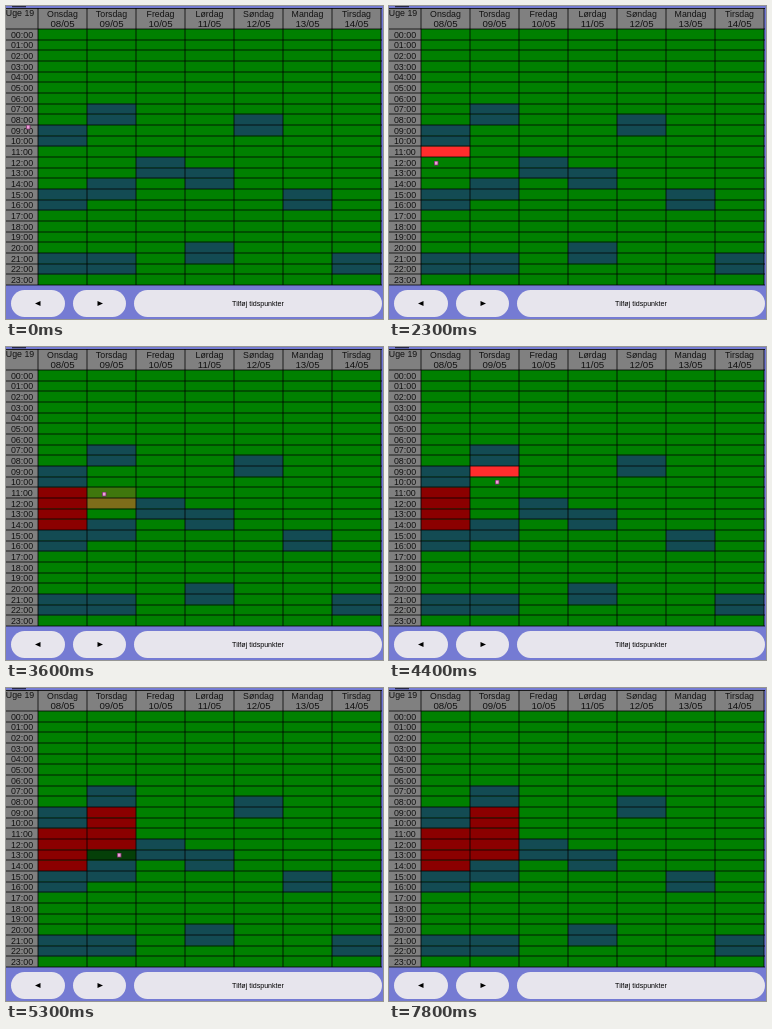
An HTML page with a canvas for the animation above (7900 ms loop, 377x313 px).

```html
<!DOCTYPE html>
<html lang="da">
<head>
<meta charset="utf-8">
<style>
  html, body { margin: 0; width: 100%; height: 100%; overflow: hidden; background: #757bd3; }
  canvas { display: block; }
</style>
</head>
<body>
<canvas id="stage" width="377" height="313"></canvas>
<script>
const ctx = document.getElementById('stage').getContext('2d');
const LOOP = 7900, STEP = 100;
const LEFT = 32, TOP = 23, COL = 49, ROW = 256 / 24;
const GREEN = '#008000', TEAL = '#134b53', DARK_RED = '#8b0000', BRIGHT_RED = '#ff2d2d', HOVER = '#053f08';
const days = ['Onsdag', 'Torsdag', 'Fredag', 'Lørdag', 'Søndag', 'Mandag', 'Tirsdag'];
// First hour of each two-hour booking, per day
const booked = [[9, 15, 21], [7, 14, 21], [12], [13, 20], [8], [15], [21]];
// A first click marks the start, a second click fills the range
const ranges = [
  { day: 0, from: 11, to: 14, start: 2100, end: 3000, leave: 3200 },
  { day: 1, from: 9, to: 13, start: 4100, end: 4800, leave: 5400 }
];
// Cells lit briefly as the pointer passes: day, hour, peak time
const trail = [[1, 13, 3400], [1, 12, 3550], [1, 11, 3700], [1, 10, 3850]];
// Pointer path: time, x, y
const path = [
  [0, 22, 121], [1600, 22, 121], [2000, 46, 147], [2300, 47, 157], [2900, 48, 178],
  [3100, 50, 178], [3400, 94, 168], [3600, 98, 147], [4000, 106, 125], [4200, 108, 128],
  [4400, 108, 135], [4800, 113, 167], [5300, 113, 167], [6000, -12, 140]
];

function rect(color, x, y, w, h) {
  ctx.fillStyle = color;
  ctx.fillRect(x, y, w, h);
}

function text(str, x, y, size, color = '#111') {
  ctx.font = `${size}px "Liberation Sans", Arial, sans-serif`;
  ctx.textAlign = 'center';
  ctx.fillStyle = color;
  ctx.fillText(str, x, y);
}

function cell(day, hour, color) {
  rect(color, LEFT + day * COL, TOP + hour * ROW, COL, ROW);
}

function button(x, w) {
  ctx.fillStyle = '#e7e5ed';
  ctx.beginPath();
  ctx.roundRect(x, 284, w, 27, 13.5);
  ctx.fill();
}

function arrow(x, dir) {
  ctx.fillStyle = '#000';
  ctx.beginPath();
  ctx.moveTo(x + 3 * dir, 297.5);
  ctx.lineTo(x - 2.5 * dir, 295);
  ctx.lineTo(x - 2.5 * dir, 300);
  ctx.fill();
}

function drawCells(t) {
  rect(GREEN, LEFT, TOP, COL * 7, ROW * 24);
  booked.forEach((hours, day) => hours.forEach(h => {
    cell(day, h, TEAL);
    cell(day, h + 1, TEAL);
  }));
  for (const [day, hour, peak] of trail) {
    const glow = Math.max(0, 1 - Math.abs(t - peak) / 150);
    if (glow) cell(day, hour, `rgba(190,100,40,${glow})`);
  }
  for (const r of ranges) {
    if (t >= r.end) {
      for (let h = r.from; h <= r.to; h++)
        cell(r.day, h, h === r.to && t < r.leave ? HOVER : DARK_RED);
    } else if (t >= r.start) cell(r.day, r.from, BRIGHT_RED);
  }
}

function drawTable(t) {
  rect('#808080', 0, 2, 375, 277);
  drawCells(t);
  const line = 'rgba(0,0,0,.78)';
  rect(line, 0, 2, 376, 1);
  for (let i = 0; i <= 24; i++) rect(line, 0, Math.round(TOP + i * ROW) - 0.5, 376, 1);
  for (let i = 0; i <= 7; i++) rect(line, LEFT + i * COL - 0.5, 2, 1, 277);
  text('Uge 19', 14, 10, 8.8);
  days.forEach((name, i) => {
    const x = LEFT + (i + 0.5) * COL;
    text(name, x, 10.5, 8.8);
    text(`${String(i + 8).padStart(2, '0')}/05`, x, 21.3, 9.7);
  });
  for (let h = 0; h < 24; h++)
    text(`${String(h).padStart(2, '0')}:00`, 16, TOP + (h + 0.5) * ROW + 3.2, 8.9);
}

function drawPointer(t) {
  const i = path.findIndex(p => p[0] > t);
  if (i < 1) return;
  const [t0, x0, y0] = path[i - 1], [t1, x1, y1] = path[i];
  const k = (t - t0) / (t1 - t0);
  const x = x0 + (x1 - x0) * k, y = y0 + (y1 - y0) * k;
  rect('#70305f', x - 2, y - 2, 4.5, 4.5);
  rect('#f0a0dc', x - 1.2, y - 1.5, 2.8, 3.2);
}

function draw(t) {
  rect('#757bd3', 0, 0, 377, 313);
  rect('#26284a', 6, 0, 14, 1.3);
  drawTable(t);
  button(5, 54);
  button(67, 53);
  button(128, 248);
  arrow(32, -1);
  arrow(94, 1);
  text('Tilføj tidspunkter', 252, 300, 7.1, '#000');
  drawPointer(t);
}

function frame() {
  const t = performance.now() % LOOP;
  draw(Math.floor(t / STEP) * STEP);
  requestAnimationFrame(frame);
}
frame();
</script>
</body>
</html>
```
